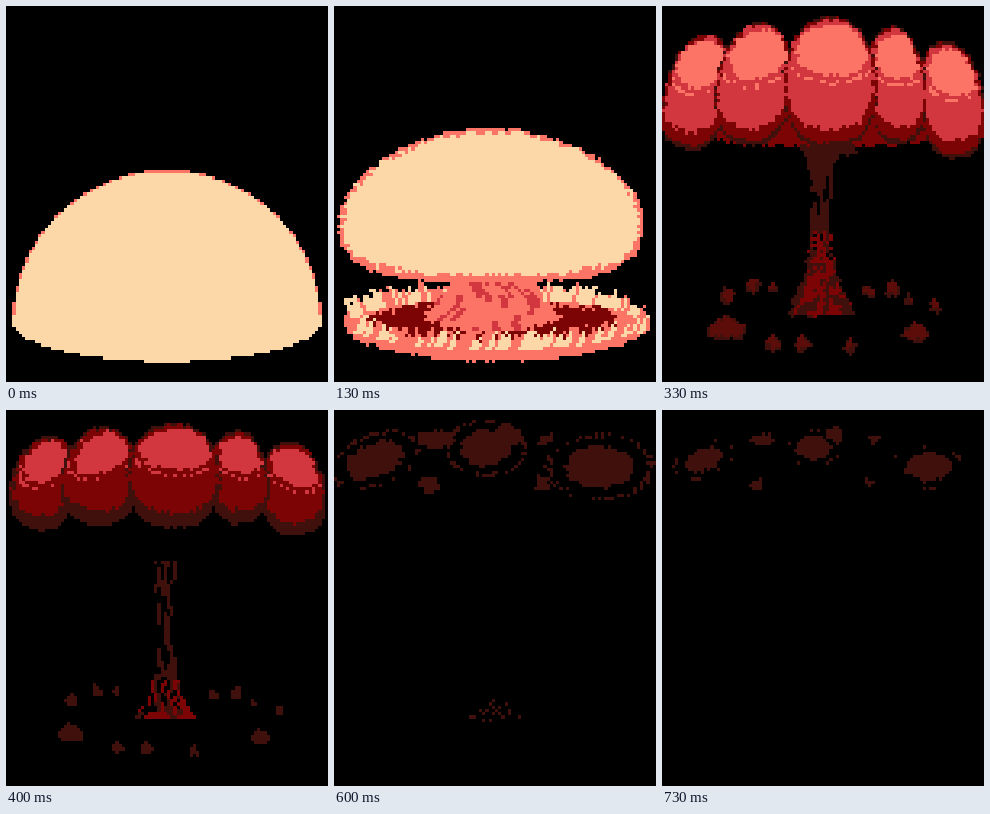
Write an HTML page with a canvas that moves like this. It is 322 px wide and 376 px high and loops after 790 ms.

```html
<!DOCTYPE html>
<html lang="en">
<head>
<meta charset="utf-8">
<title>Mushroom cloud</title>
<style>
html, body { margin: 0; height: 100%; overflow: hidden; background: #000; }
canvas { display: block; width: 100vw; height: 100vh; image-rendering: pixelated; }
</style>
</head>
<body>
<canvas id="view" width="100" height="117"></canvas>
<script>
const COLS = 100, ROWS = 117, CW = 322 / COLS, CH = 376 / ROWS;
const CREAM = '#fcd8a8', SALMON = '#fc7466', RED = '#d2363e', MAROON = '#7c0404', BROWN = '#40100c';
const view = document.getElementById('view').getContext('2d');
let g;

const hash = (a, b) => {
  const v = Math.sin(a * 127.1 + b * 311.7) * 43758.5453;
  return v - Math.floor(v);
};

// A shape is a test (x, y) => boolean in stage pixels.
// Egg: two half superellipses, exponent n above and m below the centre.
function egg(cx, cy, rx, up, down = up, { tilt = 0, n = 2, m = n } = {}) {
  const c = Math.cos(tilt * Math.PI / 180), s = Math.sin(tilt * Math.PI / 180);
  return (x, y) => {
    const u = Math.abs((x - cx) * c + (y - cy) * s) / rx, v = (y - cy) * c - (x - cx) * s;
    const q = v < 0 ? -v / up : v / down, e = v < 0 ? n : m;
    return u < 1 && q < 1 && u ** e + q ** e < 1;
  };
}

// Upright trunk that widens from its waist to the top and the foot
function trunk(cx, y0, y1, top, waist, foot, k) {
  const half = y => {
    const t = (y - y0) / (y1 - y0);
    return waist + (top - waist) * (1 - t) ** k + (foot - waist) * t ** k;
  };
  const shape = (x, y) => y > y0 && y < y1 && Math.abs(x - cx) < half(y);
  shape.across = (x, y) => (x - cx) / half(y);
  return shape;
}

const both = (a, b) => (x, y) => a(x, y) && b(x, y);
const minus = (a, b) => (x, y) => a(x, y) && !b(x, y);
const below = y0 => (x, y) => y > y0;
const inset = (f, side, top, bottom) => (x, y) =>
  f(x, y) && f(x - side, y) && f(x + side, y) && f(x, y - top) && f(x, y + bottom);
const speckle = (f, density) => (x, y) => f(x, y) && hash(Math.floor(x / CW), Math.floor(y / CH)) < density;

// Broken strands that follow the flare of a trunk
function strands(f, lanes, density, run, seed) {
  return (x, y) => {
    if (!f(x, y)) return false;
    const lane = Math.floor((f.across(x, y) + .09 * Math.sin(y / 7)) * lanes);
    return hash(lane + seed, Math.floor((y / CH + hash(lane, seed) * 9) / run)) < density;
  };
}

function paint(shape, colour, rag = 0) {
  g.fillStyle = colour;
  for (let j = 0; j < ROWS; j++)
    for (let i = 0; i < COLS; i++) {
      const dx = rag && (hash(i >> 1, j) - .5) * rag, dy = rag && (hash(i, j >> 1) - .5) * rag;
      if (shape((i + .5) * CW + dx, (j + .5) * CH + dy)) g.fillRect(i, j, 1, 1);
    }
}

function flame(x, y, cells, lean, colour) {
  g.fillStyle = colour;
  for (let k = 0; k < cells; k++)
    g.fillRect(Math.floor(x / CW + k * lean), Math.floor(y / CH) - k, k < cells / 2 ? 2 : 1, 1);
}

// Debris around the foot: x, y, radius
const ROCKS = [[65, 290, 11], [91, 281, 10], [111, 281, 6], [65, 324, 26], [111, 338, 11], [141, 338, 11],
  [188, 341, 9], [207, 286, 9], [231, 284, 12], [247, 294, 6], [273, 301, 8], [254, 328, 19]];

function rocks(size, dark, light) {
  ROCKS.forEach(([x, y, r]) => {
    const w = r * size, h = (7 + r * .4) * size;
    const rock = egg(x, y, w, h * 1.2, h * .8, { n: 1.4, m: 2.4 });
    paint(rock, dark, 5 * size);
    paint(inset(rock, 2.5 * size, 2 * size, 5 * size), light, 6 * size);
  });
}

function dome() {
  const d = egg(161, 316, 154.5, 152, 39.5);
  paint(d, SALMON);
  paint(inset(d, 1.7, 1.7, 0), CREAM);
  paint(both(d, below(309)), CREAM);
}

function blast() {
  paint(egg(162, 317, 153, 38), SALMON, 3);
  paint(egg(160, 312, 124, 19), MAROON, 12);
  for (let x = 18; x < 306; x += CW) {
    const w = Math.sqrt(1 - ((x - 162) / 150) ** 2), lean = (x - 162) / 300;
    if (Math.abs(x - 160) > 46)
      flame(x, 319 - 28 * w, 2 + 4 * hash(x, 1), lean, hash(x, 2) < .65 ? CREAM : SALMON);
    if (hash(x, 3) < .5) flame(x, 317 + 25 * w, 2 + 4 * hash(x, 4), .6, hash(x, 5) < .75 ? CREAM : SALMON);
  }
  const neck = trunk(158, 270, 326, 36, 0, 80, 1), fan = egg(158, 275, 100, 10, 52);
  paint(both(neck, fan), SALMON, 6);
  paint(both(strands(neck, 11, .3, 4, 5), fan), RED);
  const cap = egg(157, 215, 152, 93, 62, { n: 1.85, m: 3 });
  paint(cap, SALMON, 3);
  paint(inset(cap, 4, 4, 8), CREAM, 6);
}

function mushroom() {
  const stem = trunk(160, 190, 321, 36, 33, 56, 6);
  const head = trunk(160, 160, 240, 48, 30, 34, 3);
  const collar = egg(160, 185, 49, 30, 30, { n: 5, m: 2.6 });
  paint(stem, BROWN, 5);
  paint(strands(stem, 11, .55, 4, 1), MAROON);
  paint(both(strands(stem, 11, .3, 6, 2), below(238)), RED);
  paint(both(strands(stem, 11, .14, 3, 3), below(262)), SALMON);
  paint(collar, BROWN, 4);
  paint(both(strands(head, 9, .5, 3, 4), collar), MAROON, 4);

  [[48, 113, 38, 66], [272, 108, 39, 60], [90, 106, 38, 73], [228, 108, 36, 74], [160, 92, 48, 76]]
    .forEach(([x, y, rx, ry]) => {
      const puff = egg(x, y, rx, ry, ry, { m: 2.3 });
      paint(puff, MAROON, 2);
      paint(inset(puff, 1.5, 1.5, 5), RED, 4);
      paint(inset(puff, 4, 5, 10), SALMON, 5);
    });
  [[37, 74, 8, 20, 38], [34, 114, 14, 23, -8], [85, 105, 23, 57, 10], [158, 85, 34, 55, 4],
    [219, 57, 12, 23, -12], [232, 113, 20, 44, -6], [272, 103, 16, 45, -4]]
    .forEach(([x, y, rx, ry, tilt]) => paint(egg(x, y, rx, ry, ry, { tilt }), CREAM, 6));
  rocks(1, RED, SALMON);
}

// Five lobes whose tops start at y0, squeezed vertically by k
function canopy(y0, k, narrow, [glow, base, shade, low]) {
  [[36, 86, 33, 59, 14], [289, 94, 33, 59, -8], [234, 79, 30, 59, -5], [93, 78, 39, 62, 9], [168, 76, 47, 66, 0]]
    .forEach(([cx, cy, rx, ry, tilt]) => {
      const x = 159 + (cx - 159) * narrow, y = y0 + (cy - 10) * k, h = ry * k;
      const lobe = egg(x, y, rx, h, h, { tilt, m: 2.5 });
      paint(lobe, low, 2);
      paint(inset(lobe, 1, 1, 5 * k), shade, 3);
      paint(inset(lobe, 3, 3, 18 * k), base, 5);
      const spot = s => both(inset(lobe, 5, 5, 5),
        egg(x + 3, y - h * .47, rx * .78 * s, h * .38 * s, h * .38 * s, { tilt: tilt * -3 }));
      paint(speckle(minus(spot(1.35), spot(1.2)), .5), glow);
      paint(spot(1), glow, 4);
    });
}

function darkCloud() {
  const stem = trunk(159, 148, 309, 15, 8, 35, 4);
  paint(strands(stem, 5, .7, 6, 1), BROWN);
  paint(both(stem, below(255)), BROWN, 5);
  paint(both(strands(stem, 7, .5, 4, 2), below(225)), MAROON, 3);
  paint(egg(167, 122, 46, 30, 34, { m: 1.5 }), BROWN, 8);
  paint(egg(160, 105, 125, 50, 35, { m: 4 }), MAROON, 6);
  canopy(10, 1, 1, [SALMON, RED, MAROON, BROWN]);
  rocks(.72, BROWN, '#5c0d09');
}

function ember() {
  const stem = trunk(159, 152, 310, 12, 8, 32, 5);
  paint(strands(stem, 5, .55, 5, 1), BROWN);
  paint(both(strands(stem, 7, .4, 3, 2), below(270)), MAROON);
  canopy(12, .8, .98, [RED, MAROON, BROWN, BROWN]);
  rocks(.52, BROWN, BROWN);
}

function smoke() {
  canopy(15, .58, .96, [BROWN, BROWN, BROWN, BROWN]);
  paint(strands(trunk(161, 176, 300, 11, 10, 11, 2), 3, .48, 4, 1), BROWN);
  paint(egg(159, 308, 27, 18, 4, { n: 1.1 }), BROWN, 6);
  paint(speckle(egg(159, 302, 30, 18, 8), .12), BROWN);
  rocks(.36, BROWN, BROWN);
}

// Last patches of smoke; the large ones trail broken rings
function patches(size, rings) {
  [[41, 50, 20, 11, -20], [101, 30, 13, 6, 0], [152, 38, 17, 12, 0], [174, 25, 9, 7, 30],
    [266, 57, 23, 14, 0], [95, 75, 7, 5, 0], [207, 74, 5, 5, 0], [213, 29, 6, 3, -42]]
    .forEach(([x, y, rx, ry, tilt]) => {
      const patch = s => egg(x, y, rx * s, ry * s, ry * s, { tilt });
      paint(patch(size), BROWN, 4);
      if (rx > 15) paint(speckle(minus(patch(size * 1.6), patch(size * 1.4)), rings), BROWN);
    });
}

function wisps() {
  patches(1.5, .45);
  paint(speckle(egg(159, 306, 27, 16, 6), .15), BROWN);
}

const scenes = [[0, dome], [130, blast], [200, mushroom], [330, darkCloud],
  [400, ember], [530, smoke], [600, wisps], [730, () => patches(1, .25)]].map(([start, draw]) => {
  const image = document.createElement('canvas');
  image.width = COLS;
  image.height = ROWS;
  g = image.getContext('2d');
  g.fillRect(0, 0, COLS, ROWS);
  draw();
  return { start, image };
});

function tick(now) {
  const t = now % 790;
  view.drawImage(scenes.filter(s => s.start <= t).pop().image, 0, 0);
  requestAnimationFrame(tick);
}
tick(0);
</script>
</body>
</html>
```
